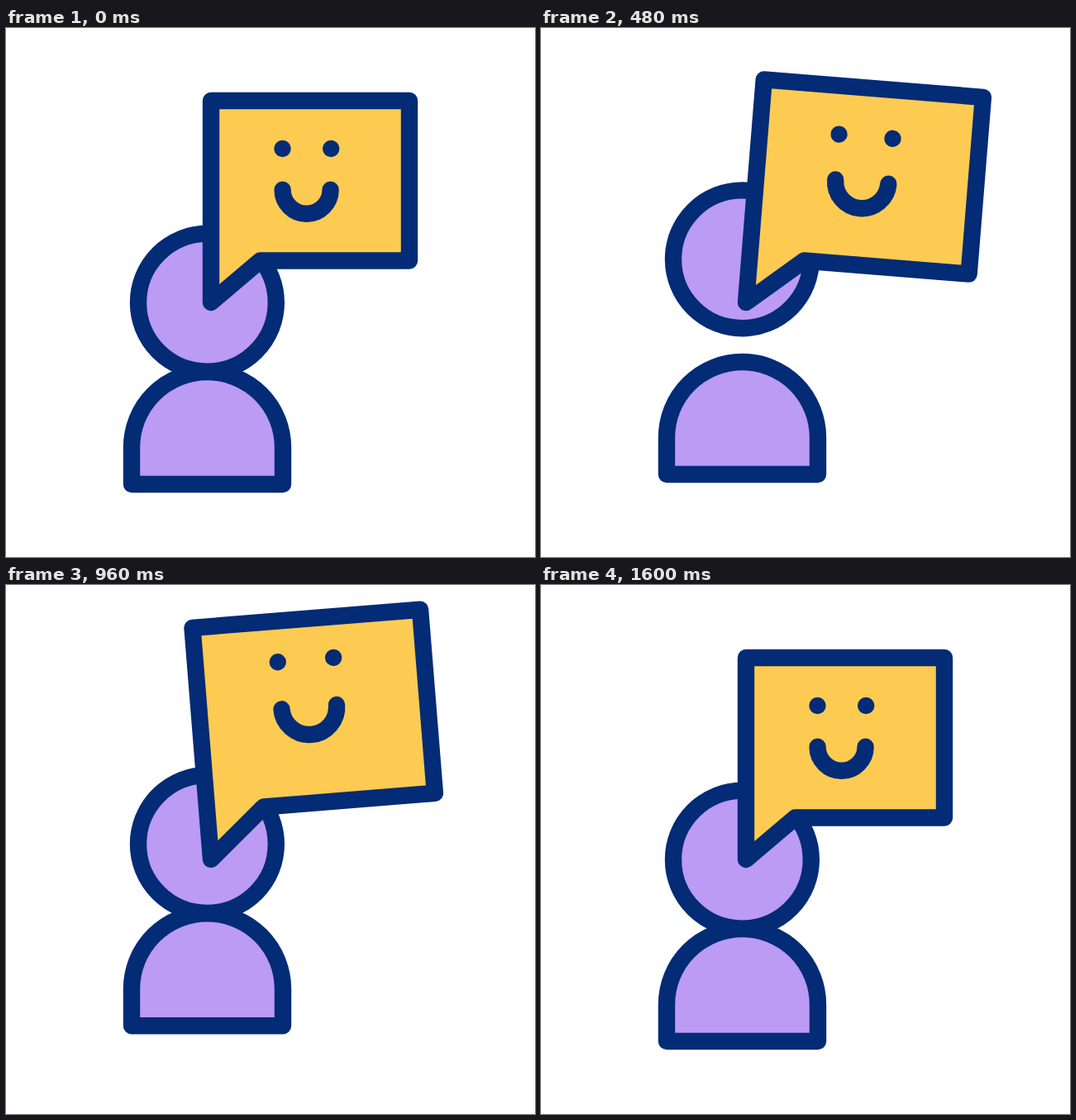
Recreate the animation shown at these times as an HTML page. Size 640 by 640 pixels, loop 1640 ms.

```html
<!DOCTYPE html>
<html lang="en">
<head>
<meta charset="utf-8">
<title>Happy message</title>
<style>
  html, body { margin: 0; width: 100%; height: 100%; overflow: hidden; background: #fff; }
  svg { display: block; width: 640px; height: 640px; }
  path, circle {
    stroke: #032b76; stroke-width: 20.4;
    stroke-linecap: round; stroke-linejoin: round;
    vector-effect: non-scaling-stroke;
  }
  .skin { fill: #bb9bf3; }
  .paper { fill: #fdcb52; }
  .line { fill: none; }
</style>
</head>
<body>
<svg viewBox="0 0 640 640">
  <path id="body" class="skin" d="M152 552V507.5a91.5 91.5 0 0 1 183 0V552Z"/>
  <circle id="head" class="skin" cx="243.4" cy="332.2" r="83.4"/>
  <g id="bubble">
    <path class="paper" d="M0 0V-244H240V-50.5H59.5Z"/>
    <g id="face">
      <path class="line" d="M86.5 -186h.01M145.2 -186h.01"/>
      <path class="line" d="M86.6 -136.3a29 29 0 0 0 58 0"/>
    </g>
  </g>
</svg>
<script>
const LOOP = 1640, STEP = 40;

// [time in ms, value] keys, eased between neighbours
const tracks = {
  body:  [[40, 0], [840, -19.3], [1600, 0]],
  hop:   [[40, 0], [400, -42], [840, 0]],
  scale: [[40, 1], [805, 1.16], [1560, 1]],
  turn:  [[40, 0], [400, 5], [840, -5], [1320, 0]],
  face:  [[240, 0], [805, -15.8], [1560, 0]]
};

// cubic-bezier(.6, 0, .4, 1)
function ease(x) {
  let lo = 0, hi = 1;
  for (let i = 0; i < 24; i++) {
    const u = (lo + hi) / 2, v = 1 - u;
    if (1.8 * v * v * u + 1.2 * v * u * u + u * u * u < x) lo = u; else hi = u;
  }
  return lo * lo * (3 - 2 * lo);
}

function valueAt(keys, t) {
  if (t <= keys[0][0]) return keys[0][1];
  for (let i = 1; i < keys.length; i++) {
    const [t0, a] = keys[i - 1], [t1, b] = keys[i];
    if (t < t1) return a + (b - a) * ease((t - t0) / (t1 - t0));
  }
  return keys[keys.length - 1][1];
}

const move = (id, transform) =>
  document.getElementById(id).setAttribute("transform", transform);

function draw(t) {
  const at = name => valueAt(tracks[name], t);
  const lift = at("body");
  move("body", `translate(0 ${lift})`);
  move("head", `translate(0 ${lift + at("hop")})`);
  move("bubble", `translate(248 332) rotate(${at("turn")}) scale(${at("scale")})`);
  move("face", `translate(0 ${at("face")})`);
}

const start = performance.now();
function tick() {
  const t = (performance.now() - start) % LOOP;
  draw(Math.floor(t / STEP) * STEP);
  requestAnimationFrame(tick);
}
draw(0);
requestAnimationFrame(tick);
</script>
</body>
</html>
```
